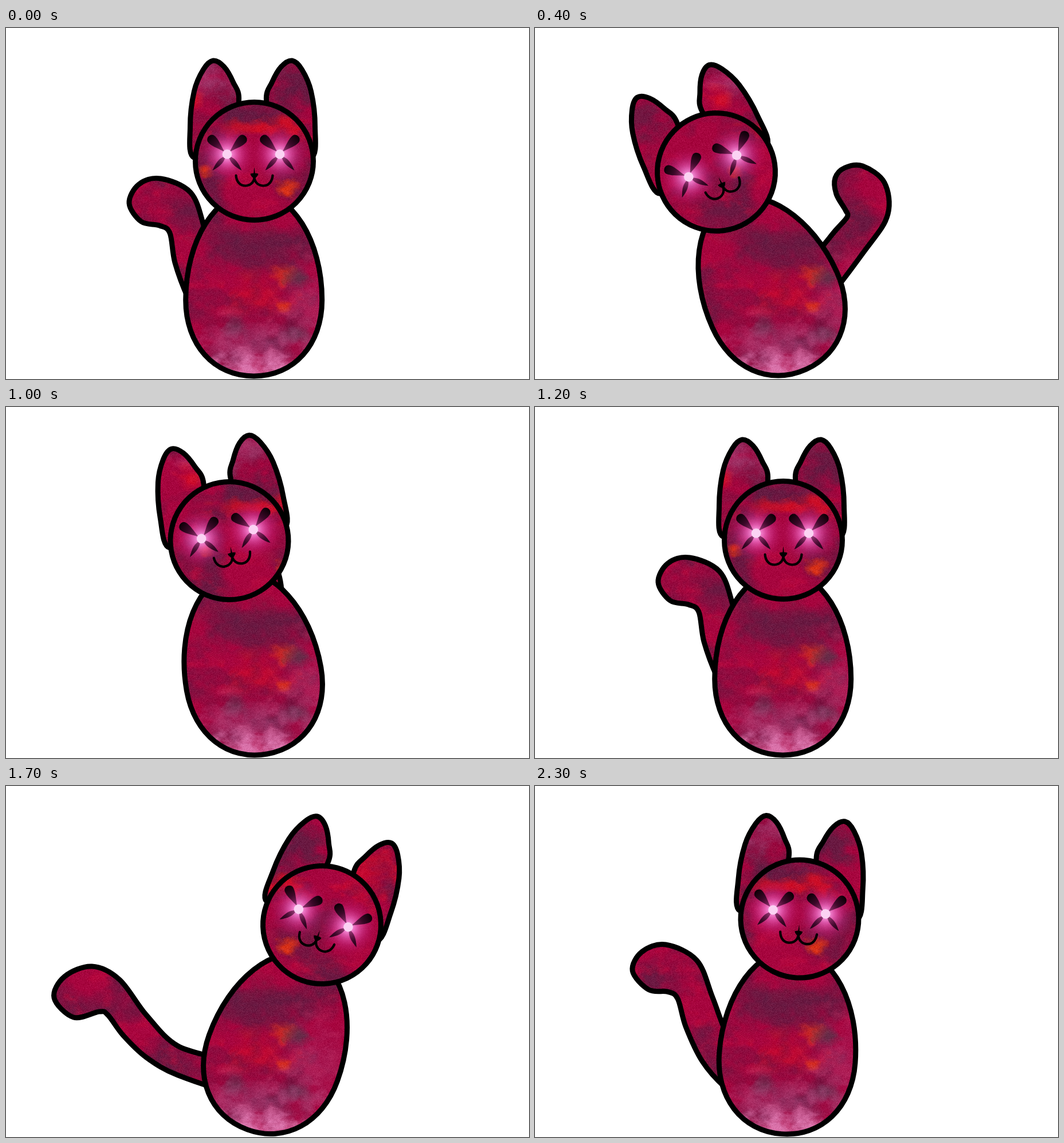
These frames come from a looping animation (913 px wide and 613 px high, 2.4 s). An HTML page with a canvas:

```html
<!DOCTYPE html>
<html lang="en">
<head>
<meta charset="utf-8">
<title>Swaying cat</title>
<style>
  html, body { margin: 0; width: 100%; height: 100%; overflow: hidden; background: #fff; }
  canvas { display: block; }
</style>
</head>
<body>
<canvas id="stage" width="913" height="613"></canvas>
<script>
const W = 913, H = 613, LOOP = 2400, STEP = 100;
const ctx = document.getElementById('stage').getContext('2d');

// ---- nebula texture, fixed to the stage ----
let seed = 7;
const rand = () => (seed = (seed * 16807) % 2147483647) / 2147483647;
const lattice = Float32Array.from({ length: 65536 }, rand);
const clamp = v => Math.max(0, Math.min(1, v));
const ease = v => v * v * (3 - 2 * v);

function noise(x, y) {
  const ix = Math.floor(x), iy = Math.floor(y);
  const u = ease(x - ix), v = ease(y - iy);
  const at = (a, b) => lattice[(a & 255) + ((b & 255) << 8)];
  const top = at(ix, iy) * (1 - u) + at(ix + 1, iy) * u;
  const low = at(ix, iy + 1) * (1 - u) + at(ix + 1, iy + 1) * u;
  return top * (1 - v) + low * v;
}

function fbm(x, y) {
  let sum = 0, amp = 0.5;
  for (let i = 0; i < 4; i++, amp /= 2, x = x * 2.1 + 17, y = y * 2.1 + 31) sum += amp * noise(x, y);
  return sum / 0.9375;
}

const PLUM = [88, 30, 66], RED = [222, 12, 34], EMBER = [226, 52, 20],
      SLATE = [84, 50, 72], PINK = [226, 128, 184], ROSE = [170, 72, 126];

// colour, x, y, radius x, radius y, strength
const patches = [
  [PLUM, 425, 150, 75, 32, 0.75], [PLUM, 505, 105, 70, 50, 0.8], [PLUM, 430, 385, 90, 50, 0.6],
  [PLUM, 195, 160, 60, 50, 0.7], [PLUM, 375, 110, 45, 40, 0.5], [PLUM, 500, 245, 50, 45, 0.4],
  [ROSE, 350, 80, 60, 45, 0.6], [ROSE, 430, 70, 45, 30, 0.5], [ROSE, 540, 480, 70, 90, 0.35],
  [RED, 490, 172, 45, 26, 0.8], [RED, 415, 174, 65, 14, 0.7], [RED, 320, 125, 26, 24, 0.7],
  [RED, 635, 150, 60, 55, 0.5], [RED, 440, 465, 55, 45, 0.4], [EMBER, 491, 280, 19, 16, 0.9],
  [EMBER, 346, 250, 16, 14, 0.9], [EMBER, 484, 429, 24, 18, 0.55], [EMBER, 483, 486, 12, 8, 0.7],
  [SLATE, 515, 437, 26, 16, 0.75], [SLATE, 400, 522, 24, 18, 0.6], [SLATE, 506, 535, 26, 16, 0.65],
  [ROSE, 430, 560, 135, 55, 0.6], [PINK, 425, 597, 95, 32, 0.85]
];

function makeTexture() {
  const cv = document.createElement('canvas');
  cv.width = W; cv.height = H;
  const g = cv.getContext('2d');
  const img = g.createImageData(W, H);
  for (let y = 0, i = 0; y < H; y++) {
    for (let x = 0; x < W; x++, i += 4) {
      const broad = fbm(x / 70, y / 55), rough = fbm(x / 22 + 90, y / 16 + 40);
      const c = [166, 4, 62];
      const blend = (to, k) => { for (let j = 0; j < 3; j++) c[j] += (to[j] - c[j]) * k; };
      blend(PLUM, 0.75 * clamp((broad - 0.42) * 3));
      blend([200, 10, 60], 0.5 * clamp((rough - 0.52) * 3));
      for (const [tone, px, py, rx, ry, k] of patches) {
        const dx = (x - px) / rx, dy = (y - py) / ry, d = dx * dx + dy * dy;
        if (d < 2) blend(tone, k * clamp(1.1 - Math.sqrt(d) + (rough - 0.5) * 1.6));
      }
      const grain = (rand() - 0.5) * 24;
      for (let j = 0; j < 3; j++) img.data[i + j] = c[j] + grain;
      img.data[i + 3] = 255;
    }
  }
  g.putImageData(img, 0, 0);
  return ctx.createPattern(cv, 'no-repeat');
}
const texture = makeTexture();

// ---- poses: swing from -600 (far left) to 600 (far right) ----
// swing, angle, head x, head y, body x
const poses = [
  [-600, -27.5, 299.5, 256, 415],
  [-400, -24.3, 316.5, 251.5, 418.4],
  [-200, -10, 390, 233.5, 432.6],
  [0, 0, 433.5, 232.5, 432.7],
  [100, 4.35, 462, 232, 440.3],
  [200, 10, 492.5, 236.5, 449.5],
  [500, 19.8, 551.5, 242.5, 466.5],
  [600, 20.8, 556, 243.5, 468]
];

// swing, then outline points from the lower root round the tip to the upper root
const tailLeft = [-400, 430,470, 470,420, 503,380, 525,353, 545,330, 542,318, 526,290,
  524,262, 541,244, 572,241, 610,270, 616,325, 580,383, 490,490];
const tailMid = [0, 385,555, 345,520, 318,472, 295,410, 286,358, 268,345, 236,338,
  215,306, 232,273, 270,263, 322,287, 345,345, 358,410, 385,470];
const tailHalf = [200, 375,548, 326,522, 278,482, 246,428, 228,385, 213,374, 178,373,
  144,340, 160,307, 205,292, 260,323, 292,393, 330,460, 375,495];
const tailRight = [500, 390,530, 300,505, 245,474, 205,436, 178,400, 163,394, 118,404,
  84,370, 102,333, 150,315, 198,338, 245,400, 300,454, 390,485];

function turned(row, swing, deg) {
  const a = deg * Math.PI / 180, c = Math.cos(a), s = Math.sin(a), out = [swing];
  for (let i = 1; i < row.length; i += 2) {
    const x = row[i] - 430, y = row[i + 1] - 540;
    out.push(430 + x * c - y * s, 540 + x * s + y * c);
  }
  return out;
}
const tails = [turned(tailLeft, -600, 13), tailLeft, tailMid, tailHalf, tailRight,
  turned(tailRight, 600, -2.7)];

// Hermite interpolation through rows keyed by their first value
function sample(rows, p) {
  const last = rows.length - 1;
  let i = 0;
  while (i < last - 1 && p > rows[i + 1][0]) i++;
  const a = rows[i], b = rows[i + 1], h = b[0] - a[0], t = (p - a[0]) / h;
  const slope = (n, j) => n === 0 || n === last ? 0
    : (rows[n + 1][j] - rows[n - 1][j]) / (rows[n + 1][0] - rows[n - 1][0]);
  const k = ease(t);
  return a.slice(1).map((v, n) => {
    const j = n + 1;
    return v + (b[j] - v) * k
      + h * t * (1 - t) * ((1 - t) * slope(i, j) - t * slope(i + 1, j));
  });
}

// ---- shapes ----
function smooth(flat) {
  const n = flat.length / 2, path = new Path2D();
  const pt = i => { const k = (i + n) % n * 2; return [flat[k], flat[k + 1]]; };
  path.moveTo(...pt(0));
  for (let i = 0; i < n; i++) {
    const [a, b, c, d] = [pt(i - 1), pt(i), pt(i + 1), pt(i + 2)];
    path.bezierCurveTo(b[0] + (c[0] - a[0]) / 6, b[1] + (c[1] - a[1]) / 6,
      c[0] - (d[0] - b[0]) / 6, c[1] - (d[1] - b[1]) / 6, c[0], c[1]);
  }
  path.closePath();
  return path;
}

const earPoints = [-102,-6, -109,-60, -102,-122, -86,-160, -69,-175.5, -50,-165, -34,-138, -24,-106, -40,-30];
const ear = smooth(earPoints);
const earMirror = smooth(earPoints.map((v, i) => i % 2 ? v : -v));
const skull = new Path2D();
skull.arc(0, 0, 103, 0, Math.PI * 2);
const torso = new Path2D(
  'M-119 0C-119 -104 -66 -189 0 -189S119 -104 119 0C119 78 70 133 0 133S-119 78 -119 0Z');
const bigPetal = new Path2D('M6 0C20 -4 30 -9 39 -8C47 -6 47 6 39 8C30 9 20 4 6 0Z');
const thinPetal = new Path2D('M4 0C14 -6 24 -5 38 0C24 5 14 6 4 0Z');
const nose = new Path2D('M-7 22Q0 20 7 22Q6 27 0 31Q-6 27 -7 22Z');
const mouth = new Path2D('M-32 25C-31 37 -24 43 -16 43C-8 43 -1 38 0 29C1 38 8 43 16 43C24 43 31 37 32 25');

function paint(shape, matrix) {
  const path = new Path2D();
  path.addPath(shape, matrix);
  ctx.fillStyle = texture;
  ctx.fill(path);
  ctx.strokeStyle = '#000';
  ctx.lineWidth = 9;
  ctx.stroke(path);
}

const petalInk = ctx.createLinearGradient(4, 0, 44, 0);
petalInk.addColorStop(0, 'rgba(96,16,66,.55)');
petalInk.addColorStop(0.55, 'rgba(48,6,34,.92)');
petalInk.addColorStop(1, '#0c0006');

const glow = ctx.createRadialGradient(0, 0, 4, 0, 0, 52);
glow.addColorStop(0, 'rgba(255,165,235,1)');
glow.addColorStop(0.25, 'rgba(236,100,190,.8)');
glow.addColorStop(0.6, 'rgba(205,45,140,.4)');
glow.addColorStop(1, 'rgba(180,10,90,0)');

function disc(r, fill) {
  ctx.beginPath();
  ctx.arc(0, 0, r, 0, Math.PI * 2);
  ctx.fillStyle = fill;
  ctx.fill();
}

function drawEye(x) {
  ctx.save();
  ctx.translate(x, -12);
  disc(52, glow);
  for (const [deg, petal] of [[-136, bigPetal], [-44, bigPetal], [132, thinPetal], [48, thinPetal]]) {
    ctx.save();
    ctx.rotate(deg * Math.PI / 180);
    ctx.fillStyle = petalInk;
    ctx.fill(petal);
    ctx.restore();
  }
  disc(8.3, '#fbd3f3');
  ctx.restore();
}

function drawFace(matrix) {
  ctx.save();
  ctx.setTransform(matrix);
  drawEye(-47.5);
  drawEye(44.5);
  ctx.fillStyle = ctx.strokeStyle = '#000';
  ctx.lineWidth = 4.2;
  ctx.lineCap = 'round';
  ctx.fill(nose);
  ctx.stroke(mouth);
  ctx.restore();
}

function draw(ms) {
  const swing = ms < LOOP / 2 ? Math.abs(ms - 600) - 600 : 600 - Math.abs(ms - 1800);
  const [angle, headX, headY, bodyX] = sample(poses, swing);
  const head = new DOMMatrix().translate(headX, headY).rotate(angle);
  const ears = head.translate(-3, 0);
  ctx.clearRect(0, 0, W, H);
  paint(smooth(sample(tails, swing)), new DOMMatrix());
  paint(torso, new DOMMatrix().translate(bodyX, 475).rotate(angle));
  paint(ear, ears);
  paint(earMirror, ears);
  paint(skull, head);
  drawFace(head);
}

const start = performance.now();
let shown = -1;
function tick() {
  const ms = Math.floor((performance.now() - start) % LOOP / STEP) * STEP;
  if (ms !== shown) draw(shown = ms);
  requestAnimationFrame(tick);
}
tick();
</script>
</body>
</html>
```
